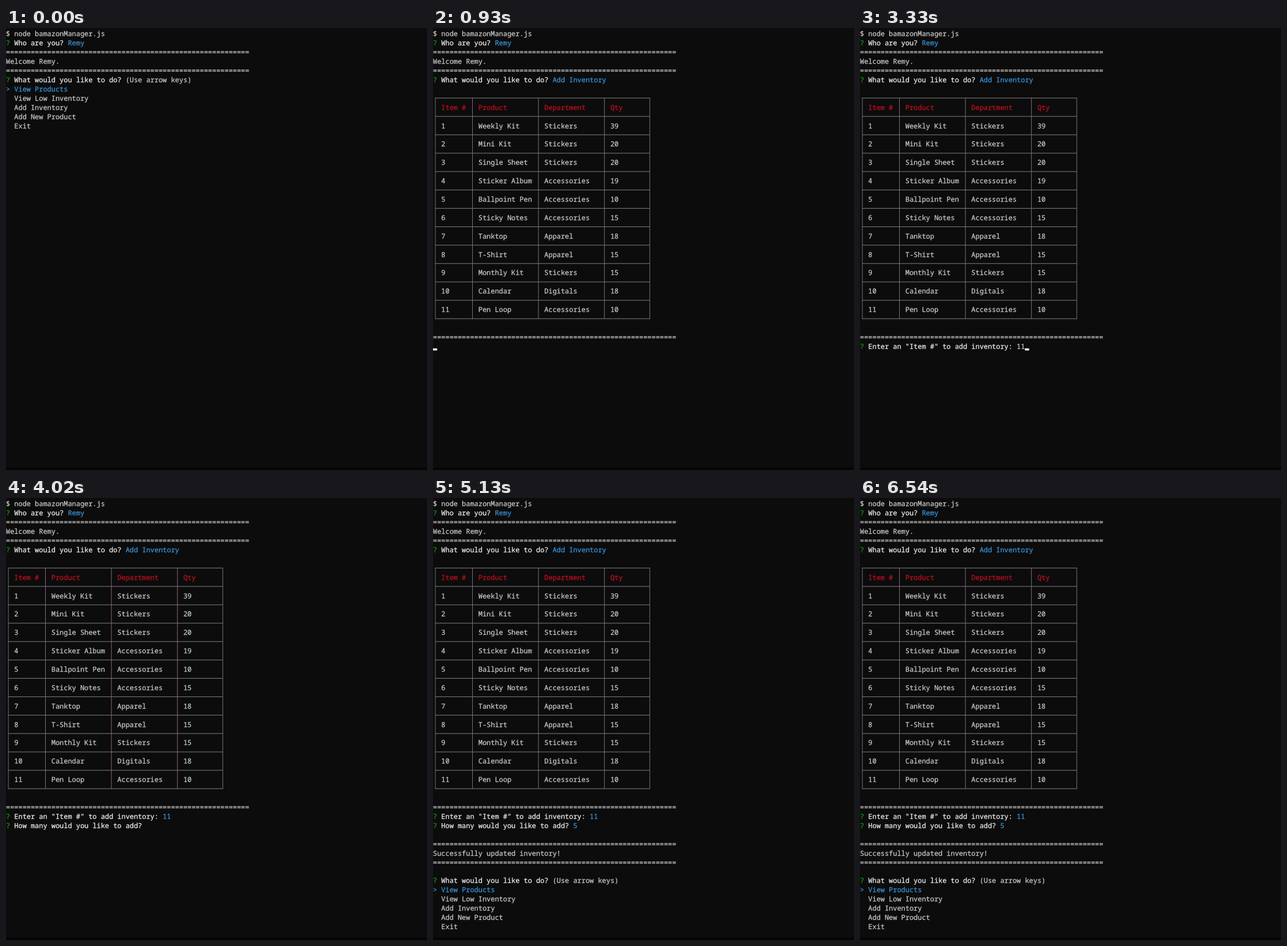
These frames come from a looping animation (731x766 px, 6.57 s). An HTML page with a canvas:

```html
<!DOCTYPE html>
<html lang="en">
<head>
<meta charset="utf-8">
<title>Inventory terminal</title>
<style>
html, body { margin: 0; width: 100%; height: 100%; overflow: hidden; background: #0c0c0c; }
canvas { display: block; width: 731px; height: 766px; }
</style>
</head>
<body>
<canvas id="stage" width="731" height="766"></canvas>
<script>
const ctx = document.getElementById('stage').getContext('2d');
const LOOP = 6570;
const CELL = 7.16, LINE = 15.935, BASE = 14.15;
const GRAY = '#cccccc', WHITE = '#f2f2f2', GREEN = '#13a10e', BLUE = '#3a96dd', RED = '#c50f1f';
const RULE = '='.repeat(59);
const USER = 'Remy';
const MENU = ['View Products', 'View Low Inventory', 'Add Inventory', 'Add New Product', 'Exit'];
const COLUMNS = [2, 11, 27, 43];
const EDGES = [0.5, 9.5, 25.5, 41.5, 52.5];
const HEAD = ['Item #', 'Product', 'Department', 'Qty'];
const STOCK = [
  ['Weekly Kit', 'Stickers', 39],
  ['Mini Kit', 'Stickers', 20],
  ['Single Sheet', 'Stickers', 20],
  ['Sticker Album', 'Accessories', 19],
  ['Ballpoint Pen', 'Accessories', 10],
  ['Sticky Notes', 'Accessories', 15],
  ['Tanktop', 'Apparel', 18],
  ['T-Shirt', 'Apparel', 15],
  ['Monthly Kit', 'Stickers', 15],
  ['Calendar', 'Digitals', 18],
  ['Pen Loop', 'Accessories', 10]
];

// Times of key presses and replies, in ms
const AT = {
  down1: 420, down2: 660, table: 930, blink1: 1470,
  askItem: 1830, blink2: 2400, digit1: 2820, digit2: 3120, enterItem: 3390,
  askCount: 3450, blink3: 4020, five: 4410, enterCount: 4740, counted: 4770, done: 4830
};

// Characters sit on the terminal grid; a hairline stroke gives them screen weight
function print(row, col, text, color = GRAY) {
  ctx.fillStyle = ctx.strokeStyle = color;
  const y = Math.round(row * LINE + BASE);
  [...String(text)].forEach((ch, i) => {
    if (ch === ' ') return;
    const x = (col + i) * CELL;
    ctx.fillText(ch, x, y);
    ctx.strokeText(ch, x, y);
  });
}

function ask(row, question, reply = '', color = BLUE) {
  print(row, 0, '?', GREEN);
  print(row, 2, question, WHITE);
  print(row, question.length + 3, reply, color);
}

function cursor(row, col) {
  ctx.fillStyle = WHITE;
  ctx.fillRect(col * CELL, row * LINE + 13.4, CELL, 3.7);
}

function menu(row, selected, hint) {
  ask(row, 'What would you like to do?', hint ? '(Use arrow keys)' : '', GRAY);
  MENU.forEach((item, i) => {
    const on = i === selected;
    if (on) print(row + 1 + i, 0, '>', BLUE);
    print(row + 1 + i, 2, item, on ? BLUE : GRAY);
  });
}

function table(row) {
  const edgeX = EDGES.map(c => c * CELL);
  const lineY = r => r * LINE + 9.3;
  const left = edgeX[0], right = edgeX[4];
  const top = lineY(row), bottom = lineY(row + 2 * STOCK.length + 2);
  ctx.fillStyle = '#808080';
  for (let i = 0; i <= STOCK.length + 1; i++) {
    ctx.fillRect(left, lineY(row + 2 * i), right - left + 1, 1);
  }
  edgeX.forEach((x, i) => {
    ctx.fillStyle = i % 4 ? '#8a6a82' : '#637d6e';
    ctx.fillRect(x, top, 1, bottom - top + 1);
  });
  HEAD.forEach((name, i) => print(row + 1, COLUMNS[i], name, RED));
  STOCK.forEach((item, n) => {
    [n + 1, ...item].forEach((cell, i) => print(row + 3 + 2 * n, COLUMNS[i], cell));
  });
}

function itemPrompt(t) {
  if (t < AT.askItem) {
    if (t < AT.blink1) cursor(34, 0);
    return;
  }
  const typed = t < AT.digit1 ? '' : t < AT.digit2 ? '1' : '11';
  const entered = t >= AT.enterItem;
  ask(34, 'Enter an "Item #" to add inventory:', typed, entered ? BLUE : GRAY);
  if (!entered && (t < AT.blink2 || typed)) cursor(34, 38 + typed.length);
}

function countPrompt(t) {
  if (t < AT.askCount || (t >= AT.enterCount && t < AT.counted)) {
    cursor(35, 0);
    return;
  }
  const typed = t < AT.five ? '' : '5';
  const entered = t >= AT.counted;
  ask(35, 'How many would you like to add?', typed, entered ? BLUE : GRAY);
  if (entered) {
    if (t < AT.done) cursor(36, 0);
  } else if (t < AT.blink3 || typed) {
    cursor(35, 34 + typed.length);
  }
}

function draw(t) {
  ctx.fillStyle = '#0c0c0c';
  ctx.fillRect(0, 0, 731, 766);
  ctx.fillStyle = '#050505';
  ctx.fillRect(0, 762, 731, 4);

  print(0, 0, '$ node bamazonManager.js');
  ask(1, 'Who are you?', USER);
  print(2, 0, RULE);
  print(3, 0, `Welcome ${USER}.`);
  print(4, 0, RULE);

  if (t < AT.table) {
    menu(5, t < AT.down1 ? 0 : t < AT.down2 ? 1 : 2, t < AT.down1);
    return;
  }
  ask(5, 'What would you like to do?', MENU[2]);
  table(7);
  print(33, 0, RULE);
  itemPrompt(t);
  if (t >= AT.enterItem) countPrompt(t);
  if (t >= AT.done) {
    print(37, 0, RULE);
    print(38, 0, 'Successfully updated inventory!');
    print(39, 0, RULE);
    menu(41, 0, true);
  }
}

ctx.font = '11.93px "Noto Sans Mono", "DejaVu Sans Mono", monospace';
ctx.textBaseline = 'alphabetic';
ctx.textRendering = 'geometricPrecision';
ctx.lineWidth = 0.25;
ctx.lineJoin = 'round';

const start = performance.now();
function tick() {
  draw((performance.now() - start) % LOOP);
  requestAnimationFrame(tick);
}
tick();
</script>
</body>
</html>
```
